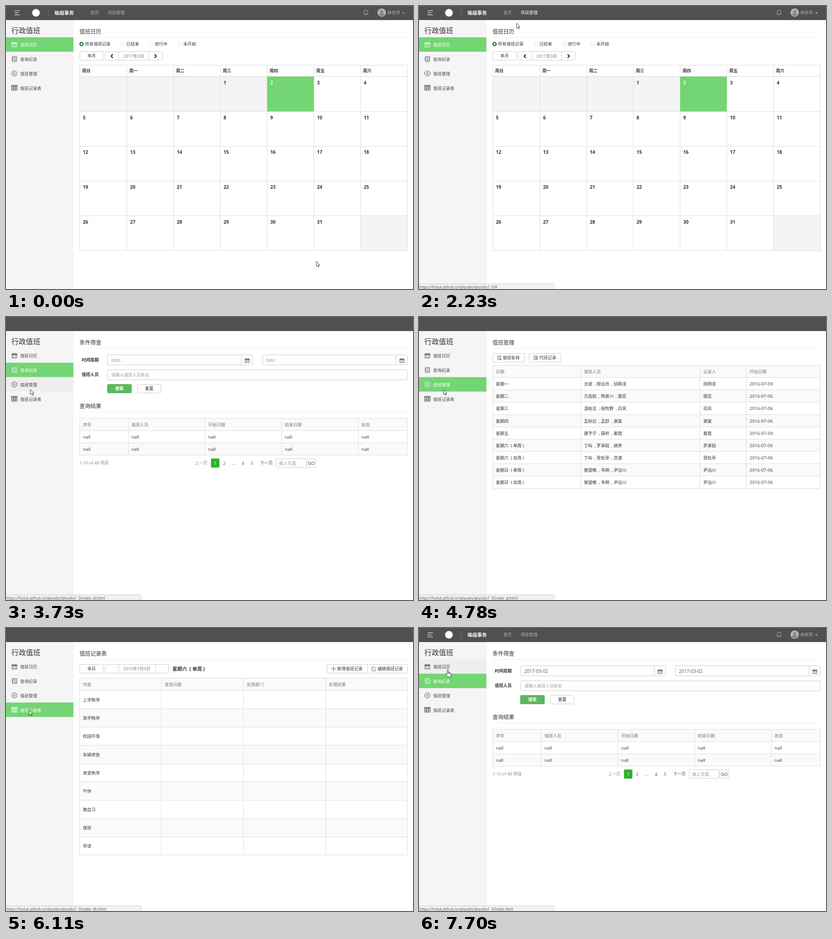
An HTML page for the animation above (8 s loop, 897x624 px).

```html
<!DOCTYPE html>
<html lang="zh-CN">
<head>
<meta charset="utf-8">
<style>
html, body { margin: 0; width: 100%; height: 100%; overflow: hidden; background: #fff; }
svg { display: block; width: 100%; height: 100%; }
text { font-family: "Open Sans", "Noto Sans CJK SC", "Noto Sans CJK", sans-serif; white-space: pre; }
</style>
</head>
<body>
<svg id="stage" viewBox="0 0 897 624"></svg>
<script>
const LOOP = 8000, GREEN = '#73d573', LINE = '#ddd', EDGE = '#ccc', SIZE = 9.3;
const $ = id => document.getElementById(id);

// Drawing helpers: text is centred vertically on y
const text = (x, y, s, fill = '#333', size = SIZE, more = '') => {
  if (/^[\x20-\x7e]+$/.test(s)) size *= 1.06;
  return `<text x="${x}" y="${(y + size * .37).toFixed(2)}" font-size="${size.toFixed(2)}" fill="${fill}" ${more}>${s}</text>`;
};
const BOLD = 'font-weight="700"', MID = 'text-anchor="middle"';
const rect = (x, y, w, h, fill, stroke = 'none', r = 0, more = '') =>
  `<rect x="${x}" y="${y}" width="${w}" height="${h}" fill="${fill}" stroke="${stroke}" rx="${r}" ${more}/>`;
const circle = (x, y, r, fill, stroke = 'none', width = 1) =>
  `<circle cx="${x}" cy="${y}" r="${r}" fill="${fill}" stroke="${stroke}" stroke-width="${width}"/>`;
const path = (d, stroke = LINE, width = 1, fill = 'none', more = '') =>
  `<path d="${d}" stroke="${stroke}" stroke-width="${width}" fill="${fill}" ${more}/>`;
const group = (body, attrs = '') => `<g ${attrs}>${body}</g>`;
const box = (x, y, w, h) => rect(x + .5, y + .5, w, h, '#fff', EDGE, 2);
const button = (x, y, w, s) => box(x, y, w, 19) + text(x + w / 2 + .5, y + 10, s, '#333', SIZE, MID);
const heading = (y, s) => text(162, y, s, '#333', 12) + path(`M162 ${y + 12.5}H885`, '#eee');

// Icons, 12px around their own centre
const ICONS = {
  cal: 'M-5.5-4H5.5V5.5H-5.5ZM-5.5-1.5H5.5M-5.5-2.7H5.5M-3-6V-3M3-6V-3M-3.5 1H-2M-.8 1H.8M2 1H3.5M-3.5 3.3H-2M-.8 3.3H.8M2 3.3H3.5',
  list: 'M-4-5.5H5V5.5H-4ZM-6-3H-3M-6 0H-3M-6 3H-3M-1.5-3H3.5M-1.5 0H3.5M-1.5 3H3.5',
  gear: 'M-2.6-5.5H2.6L3.6-3.6 5.8-2.6V2.6L3.6 3.6 2.6 5.5H-2.6L-3.6 3.6-5.8 2.6V-2.6L-3.6-3.6ZM-2 0A2 2 0 1 0 2 0A2 2 0 1 0-2 0',
  grid: 'M-6.3-5.5H6.3V5.5H-6.3ZM-6.3-3H6.3M-6.3-4.3H6.3M-6.3 0H6.3M-6.3 2.8H6.3M-2-3V5.5M2-3V5.5',
  page: 'M-4-5H4V5H-4ZM-2-2.5H2M-2 0H1M1 2H3V4H1Z',
  sheet: 'M-4-5H4V5H-4ZM-2-2.5H5M-2 0H5M-2 2.5H5',
  plus: 'M-5 0H5M0-5V5',
  edit: 'M1-4.5H-5V5H4V0M-1.5 1.5L5.5-5'
};
const icon = (name, x, y, scale = 1, color = '#444') =>
  path(ICONS[name], color, .9, 'none', `transform="translate(${x} ${y}) scale(${scale})"`);
const chevrons = (a, b) =>
  path(`M${a + 2} 106.5L${a - 2} 110.5 ${a + 2} 114.5M${b - 2} 106.5L${b + 2} 110.5 ${b - 2} 114.5`, '#222', 2);

const lines = (xs, ys) => {
  const [l, r, t, b] = [xs[0], xs.at(-1), ys[0], ys.at(-1)];
  return path(xs.map(x => `M${x} ${t}V${b}`).join('') + ys.map(y => `M${l} ${y}H${r}`).join(''));
};
// Header row, then striped body rows
const ROW_H = 27.15;
function table(xs, top, rowH, rows) {
  const ys = [top, ...rows.map((_, i) => Math.floor(top + ROW_H + i * rowH) + .5)];
  const w = xs.at(-1) - xs[0];
  let out = '';
  rows.forEach((row, i) => {
    const y = ys[i], h = ys[i + 1] - y;
    if (i % 2 == 0) out += rect(xs[0], y, w, h, '#fafafa');
    row.forEach((s, j) => out += text(xs[j] + 7, y + h / 2 + .3, s, i ? '#333' : '#777'));
  });
  return out + lines(xs, ys);
}

function calendarPage() {
  const xs = [162.5, 266.5, 369.5, 472.5, 575.5, 678.5, 781.5, 884.5];
  const ys = [130.5, 155.5, 232.5, 309.5, 386.5, 462.5, 539.5];
  let out = heading(57, '值班日历');
  [[166.5, '所有值班记录'], [257.5, '已结束'], [320, '进行中'], [383, '未开始']].forEach(([x, s], i) => {
    out += i ? circle(x, 84, 4.2, '#fff', '#ddd') : circle(x, 84, 3.5, '#fff', '#267326', 2.4);
    out += text(x + 7.8, 84, s);
  });
  out += button(162, 100, 52, '本月') + box(218, 100, 126, 19) + path('M248.5 100V120M314.5 100V120', EDGE);
  out += text(281.5, 110.5, '2017年3月', '#777', SIZE, MID) + chevrons(233.5, 329.5);
  out += rect(162.5, 155.5, 413, 77, '#f4f4f4') + rect(781.5, 462.5, 103, 77, '#f4f4f4');
  [...'日一二三四五六'].forEach((d, i) => out += text(xs[i] + 5.3, 143, '周' + d, '#333', SIZE, BOLD));
  out += lines(xs, ys) + path('M162 155.5H885', '#d4d4d4', 1.2) + rect(575.5, 155.5, 103, 77, GREEN);
  for (let d = 1; d <= 31; d++) {
    const n = d + 2;
    out += text(xs[n % 7] + 7, 169 + 76.75 * Math.floor(n / 7), '' + d, d == 2 ? '#fff' : '#333', 9.6, BOLD);
  }
  return out;
}

function searchPage() {
  let out = heading(57, '条件筛查') + text(167, 95, '时间周期', '#333', SIZE, BOLD) + text(167, 127, '值班人员', '#333', SIZE, BOLD);
  for (const x of [223, 564])
    out += box(x, 83, 320, 22) + path(`M${x + 295.5} 84V105`, EDGE) + icon('cal', x + 308.5, 96, .85, '#333');
  const dates = (s, c) => text(232, 95, s, c, 9.5) + text(572.5, 95, s, c, 9.5);
  out += group(dates('date', '#999'), 'class="raw"') + group(dates('2017-03-02', '#555'), 'class="ready"');
  out += box(223, 116, 661, 22) + text(232, 127.5, '请输入值班人员姓名', '#999');
  out += rect(223.5, 148.5, 53, 19, '#5cb85c', '#54b354', 2) + text(250, 158, '搜索', '#fff', SIZE, MID + ' ' + BOLD);
  out += button(289, 148, 52, '重置') + heading(197, '查询结果');
  const nall = Array(5).fill('nall');
  out += table([162.5, 269.5, 438.5, 607.5, 776.5, 884.5], 223.5, ROW_H,
    [['序号', '值班人员', '开始日期', '结束日期', '状态'], nall, nall]);
  out += text(162, 322, '1-10 of 48 项目', '#888') + text(416, 322, '上一页', '#999');
  out += rect(451.7, 312, 18.6, 20, '#2eb02e', 'none', 2) + text(461, 322, '1', '#fff', SIZE, MID);
  [[481, '2'], [502, '...'], [522.5, '4'], [542.5, '5']].forEach(([x, s]) => out += text(x, 322, s, '#555', SIZE, MID));
  return out + text(560, 322, '下一页', '#555') + box(595, 312, 66, 19) + text(602, 322.5, '输入页面', '#999') +
    box(663, 312, 19, 19) + text(673, 322, 'GO', '#333', SIZE, MID);
}

function staffPage() {
  const teams = ['沈诺 顾远舟 邱明泽', '方启航 陶景川 唐蕊', '温柏言 程牧野 白岚', '孟秋石 孟舒 谢棠', '康予宁 薛岭 秦茵',
    '丁屿 罗承砚 姚荞', '丁屿 贺松亭 范澈', '施望樵 韦朔 尹泊川', '施望樵 韦朔 尹泊川'];
  const days = [...'一二三四五', ...[...'六日'].flatMap(d => [...'单双'].map(w => `${d}  ( ${w}周 )`))];
  const rows = teams.map((team, i) => {
    const names = team.split(' ');
    return ['星期' + days[i], names.join('  , '), names[i == 5 || i == 6 ? 1 : 2],
      '2016-07-0' + (i % 4 == 0 && i < 8 ? 9 : 6)];
  });
  return heading(57, '值班管理') + box(162, 80, 70, 19) + icon('page', 177, 90, .85) + text(184.5, 90, '值班安排') +
    box(242, 80, 70, 19) + icon('sheet', 257, 90, .85) + text(265, 90, '代班记录') +
    table([162.5, 356.5, 619.5, 721.5, 884.5], 106.5, ROW_H, [['日期', '值班人员', '记录人', '开始日期'], ...rows]);
}

function recordPage() {
  const items = ['上学秩序', '放学秩序', '校园环境', '车辆停放', '食堂秩序', '午休', '晚自习', '夜班', '早读'];
  return heading(57, '值班记录表') + button(162, 80, 52, '本日') + box(218, 80, 140, 19) +
    path('M248.5 80V100M329.5 80V100', EDGE) + text(288.5, 90, '2016年7月9日', '#777', SIZE, MID) +
    group(chevrons(233.5, 344.5), 'class="ready" transform="translate(0 -20)"') +
    text(367, 90, '星期六  ( 单周 )', '#333', 10.6, BOLD) +
    box(707, 80, 177, 19) + path('M796.5 80V100', EDGE) + icon('plus', 722, 90) + text(730, 90, '新增值班记录') +
    icon('edit', 811, 90, .9) + text(819, 90, '编辑值班记录') +
    table([162.5, 342.5, 523.5, 704.5, 884.5], 110.5, 40.35,
      [['内容', '发现问题', '反馈部门', '处理结果'], ...items.map(s => [s])]);
}

const header = () =>
  path('M18.5 10.5H30.5M18.5 15H27.5M18.5 19.5H30.5', '#ccc', 1.3) +
  circle(66, 15, 8.5, '#fff') + path('M93.5 7V23', '#777') +
  text(107, 15, '榆庭事务', '#fff', 10.67, BOLD) +
  rect(176, 0, 38.5, 31, '#6e6e6e', 'none', 0, 'id="bg0"') + rect(214.5, 0, 56.5, 31, '#6e6e6e', 'none', 0, 'id="bg1"') +
  text(186, 14.5, '首页', '', SIZE, 'id="nav0"') + text(224, 14.5, '项目管理', '', SIZE, 'id="nav1"') +
  path('M788 18H798.5L797 15.5V12.5A3.7 3.7 0 0 0 789.5 12.5V15.5ZM792 19.5H794.5M793.2 8.5V9.5', '#bbb') +
  circle(828, 14.5, 9.3, '#b4b4b4') + circle(828, 12, 3.3, '#888') +
  path('M822 20A6 5 0 0 1 834 20A9 9 0 0 1 822 20Z', 'none', 0, '#888') +
  text(840.5, 14.5, '林老师', '#b0b0b0') + path('M873 14H879L876 17Z', 'none', 0, '#b0b0b0');

const ROW = 31.8, rowTop = i => 69 + ROW * i;
const menu = ['值班日历', '查询纪录', '值班管理', '值班记录表'].map((s, i) =>
  group(rect(0, rowTop(i), 148.5, ROW, 'none') + icon(['cal', 'list', 'gear', 'grid'][i], 18.5, rowTop(i) + 16, 1, 'currentColor') +
    text(31.3, rowTop(i) + 17, s, 'currentColor'), `id="row${i}"`)).join('');

$('stage').innerHTML = rect(0, 0, 897, 624, '#fff') + rect(0, 31, 149, 593, '#f5f5f5') +
  rect(0, 0, 897, 31, '#505050') + group(header(), 'id="header"') +
  text(12, 54, '行政值班', '#333', 15.9) + menu +
  [calendarPage, searchPage, staffPage, recordPage].map((draw, i) => group(draw(), `id="page${i}"`)).join('') +
  group(rect(-2.5, 612.5, 300, 20, '#f2f2f2', '#ccc', 2) + text(1, 619.7, '', '#555', 8.2, 'id="url"'), 'id="status"') +
  group(path('M0 0V11L2.6 8.6 4.4 12.7 6.1 12 4.4 8H7.7Z', '#222', .9, '#fff'), 'id="arrow"') +
  group(path('M-1.8 9V1.3A1.3 1.3 0 0 1 .8 1.3V6L3.6 6.6Q6.8 7 6.8 9V12Q6.5 14 5.5 16.2H-1L-4.8 10.5Q-4.8 8.5-3.3 9L-1.8 10.5ZM.8 6V9M3 6.5V9M5 7V9', '#222', .9, '#fff'), 'id="hand"');

// Timeline
const moves = [[70, 684, 563], [420, 150, 300], [600, 6, 110], [810, 129, 27], [890, 129, 27], [970, 193, 18],
  [1290, 193, 18], [1540, 244, 16], [2070, 244, 16], [2230, 215, 38], [2500, 120, 84], [2770, 62, 118], [2940, 62, 118],
  [3260, 54, 122], [3490, 54, 122], [3600, 54, 150], [3730, 54, 160], [4850, 54, 160], [4980, 57, 191], [5040, 57, 191],
  [5200, 57, 202], [5350, 51, 181], [6220, 51, 181], [6820, 78, 132], [6920, 78, 132], [6980, 64, 114], [7290, 64, 114], [7570, 64, 92]];
const hands = [[930, 1920], [2770, 3260], [4260, 4420], [5510, 5640], [6980, 7150], [7570, LOOP]];
const pages = [[-1e4, 0], [3490, 1], [4780, 2], [6110, 3], [7290, 1]];
const links = [[0, ''], [1400, '#'], [2550, 'index.html'], [2850, 'index_cx.html'], [3640, 'index_gl.html'],
  [4900, 'index_jlb.html'], [6450, 'index_gl.html'], [6850, 'index_cx.html'], [7600, 'index.html']];
const LOAD = 410;

const latest = (list, t) => list.findLast(e => e[0] <= t);
function cursorAt(t) {
  const i = moves.findIndex(m => m[0] > t);
  if (i < 1) return (i ? moves.at(-1) : moves[0]).slice(1);
  const [a, b] = [moves[i - 1], moves[i]], k = (t - a[0]) / (b[0] - a[0]);
  return [a[1] + (b[1] - a[1]) * k, a[2] + (b[2] - a[2]) * k];
}
const show = (el, on) => el.style.display = on ? '' : 'none';

function render(t) {
  // The menu reacts slightly behind the pointer
  const [x, y] = cursorAt(t), [hx, hy] = cursorAt(t - 120);
  const [since, page] = latest(pages, t), ready = t - since >= LOAD;
  const hover = hx < 148 ? Math.floor((hy - 69) / ROW) : -1;
  for (let i = 0; i < 4; i++) {
    show($('page' + i), i == page);
    const row = $('row' + i);
    row.style.color = i == page ? '#fff' : '#444';
    row.firstChild.setAttribute('fill', i == page ? GREEN : i == hover ? '#eee' : 'none');
  }
  show($('header'), ready);
  document.querySelectorAll('.ready').forEach(e => show(e, ready));
  document.querySelectorAll('.raw').forEach(e => show(e, !ready));
  show($('bg0'), y < 31 && x >= 176 && x < 214.5);
  show($('bg1'), y < 31 && x >= 214.5 && x < 271);
  $('nav0').setAttribute('fill', t >= 1040 && t < 1760 ? '#fff' : '#b0b0b0');
  $('nav1').setAttribute('fill', t >= 1450 && t < 2400 ? '#fff' : '#b0b0b0');

  const link = latest(links, t)[1];
  show($('status'), link);
  $('url').textContent = 'https://holuk.github.io/qkyuibs/qkyuibs1_0/' + link;

  const hand = hands.some(([a, b]) => t >= a && t < b);
  show($('hand'), hand);
  show($('arrow'), !hand);
  $(hand ? 'hand' : 'arrow').setAttribute('transform', `translate(${Math.round(x)} ${Math.round(y)})`);
}

function frame() {
  render(performance.now() % LOOP);
  requestAnimationFrame(frame);
}
frame();
</script>
</body>
</html>
```
